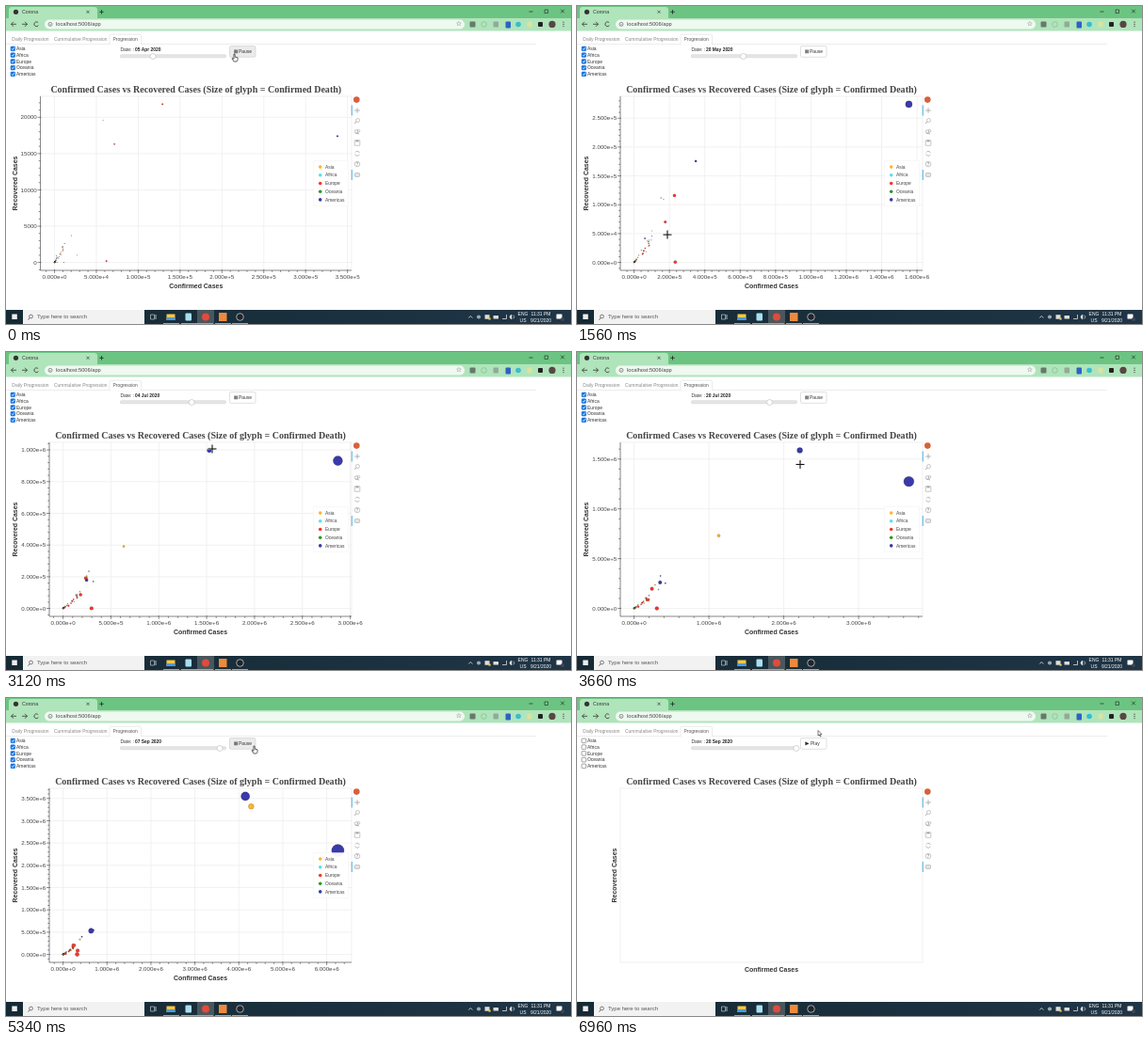
Write an HTML page with a canvas that moves like this. It is 600 px wide and 338 px high and loops after 7080 ms.

```html
<!DOCTYPE html>
<html lang="en">
<meta charset="utf-8">
<title>Progression</title>
<style>
html, body { margin: 0; width: 100%; height: 100%; overflow: hidden; background: #fff }
canvas { display: block }
</style>
<canvas id="stage" width="600" height="338"></canvas>
<script>
const c = document.getElementById('stage').getContext('2d');
const SANS = '"Liberation Sans", Arial, sans-serif';
const SERIF = '"Liberation Serif", "Times New Roman", serif';
const LOOP = 7080, STEP = 60, LAST_DAY = 168;
const TOP = 96, BOTTOM = 281, RIGHT = 367;

const ASIA = 0, AFRICA = 1, EUROPE = 2, OCEANIA = 3, AMERICAS = 4;
const continents = Object.entries({
  Asia: '#ffb52e', Africa: '#55e0f0', Europe: '#f5382c', Oceania: '#269a26', Americas: '#3a3aa8'
}).map(([name, color], i) => ({ name, color, off: 6060 + i * 135 }));

// Epidemic wave: cases added since day 0 by a logistic rise around day `mid`.
const sigmoid = v => 1 / (1 + Math.exp(-v));
const wave = (d, height, mid, width) => height * (sigmoid((d - mid) / width) - sigmoid(-mid / width));
const progress = d => (d + 4) / (LAST_DAY + 4);

// x, y: thousands of confirmed and recovered cases by day; the glyph grows as progress ** power.
const countries = [];
const country = (group, size, power, x, y) => countries.push({ group, size, power, x, y });

let seed = 11;
const rand = () => (seed = seed * 16807 % 2147483647) / 2147483647;
for (let i = 0; i < 42; i++) {
  const total = 3 + 290 * rand() ** 4, luck = .6 + .5 * rand();
  const x = d => total * progress(d) ** .85;
  const group = [ASIA, AFRICA, EUROPE, AMERICAS, EUROPE, ASIA, OCEANIA][i % 7];
  country(group, group == EUROPE ? .8 : .55, .2, x, d => x(d) * luck * (.15 + .65 * progress(d) ** .6));
}
country(ASIA, .9, .3, d => 58 + 2.1 * d, d => 19.6 + 2.05 * d);
country(ASIA, .7, .3, d => 27 + wave(d, 440, 0, 30), d => 1 + wave(d, 230, 40, 18));
country(ASIA, 3.3, 1.7, d => 3.6 + wave(d, 7812, 150, 25), d => wave(d, 6951, 157, 24));
country(AFRICA, 1.1, 1, d => 1.6 + wave(d, 650, 106, 13), d => wave(d, 600, 116, 13));
country(EUROPE, 2.1, .25, d => 129 + wave(d, 220, 0, 15), d => 21.8 + wave(d, 200, 40, 18));
country(EUROPE, 1.9, .25, d => 71.5 + wave(d, 220, 0, 12) + wave(d, 300, 155, 12), d => 16.3 + wave(d, 85, 25, 15));
country(EUROPE, 2.2, .25, d => 62 + .3 * d + wave(d, 260, 24, 16), d => .2 + .01 * d);
country(EUROPE, 1.2, .3, d => 20 + wave(d, 75, 0, 20), d => 3.7 + wave(d, 28, 0, 18));
country(AMERICAS, 1, .8, d => 2.3 + wave(d, 905, 105, 35), d => .9 + wave(d, 760, 125, 30));
country(AMERICAS, .8, .5, d => 4.5 + wave(d, 430, 82, 16), d => .6 + wave(d, 400, 85, 14));
country(AMERICAS, 2.9, 1, d => 2.1 + wave(d, 810, 112, 30), d => .6 + wave(d, 710, 120, 30));
country(AMERICAS, 5.1, 1.2, d => 11 + wave(d, 5140, 112, 28), d => wave(d, 4470, 120, 25));
country(AMERICAS, 6.9, .52, d => 338 + 27 * d + wave(d, 1750, 115, 9), d => 17.4 + wave(d, 3242, 117, 35));

function text(s, x, y, size, color = '#444', align = 'left', weight = '', face = SANS) {
  c.font = `${weight} ${size}px ${face}`;
  c.textAlign = align;
  c.textBaseline = 'middle';
  c.fillStyle = color;
  c.fillText(s, x, y);
}
function rect(x, y, w, h, color) {
  c.fillStyle = color;
  c.fillRect(x, y, w, h);
}
function box(x, y, w, h, r, fill, edge, width = .6) {
  c.beginPath();
  c.roundRect(x, y, w, h, r);
  if (fill) { c.fillStyle = fill; c.fill(); }
  if (edge) { c.strokeStyle = edge; c.lineWidth = width; c.stroke(); }
}
const dot = (x, y, r, fill, edge, width) => box(x - r, y - r, 2 * r, 2 * r, r, fill, edge, width);
function path(points, color, width = .8, fill) {
  c.beginPath();
  points.forEach((v, i) => { if (i % 2) c.lineTo(points[i - 1], v); });
  if (fill) { c.closePath(); c.fillStyle = fill; c.fill(); }
  c.strokeStyle = color;
  c.lineWidth = width;
  c.stroke();
}
const line = (x1, y1, x2, y2, color, width) => path([x1, y1, x2, y2], color, width);
function arc(x, y, r, from, to, color, width = .7) {
  c.beginPath();
  c.arc(x, y, r, from, to);
  c.strokeStyle = color;
  c.lineWidth = width;
  c.stroke();
}
function plus(x, y, r, color, width) {
  line(x - r, y, x + r, y, color, width);
  line(x, y - r, x, y + r, color, width);
}
function cross(x, y, r, color) {
  line(x - r, y - r, x + r, y + r, color, .7);
  line(x - r, y + r, x + r, y - r, color, .7);
}

function browser() {
  rect(0, 0, 600, 13, '#6cc482');
  rect(0, 13, 600, 13.5, '#b0e4bb');
  box(3, 1, 94, 14, [3, 3, 0, 0], '#b0e4bb');
  dot(10.5, 6.3, 2.6, '#333');
  text('Corona', 17, 6.5, 5.2, '#333');
  cross(87, 6.3, 1.5, '#333');
  plus(101.5, 6.3, 2.2, '#222', .8);
  line(555.5, 6, 559.5, 6, '#222', .7);
  box(572, 4, 3.5, 3.5, 0, null, '#222');
  cross(591, 5.5, 1.8, '#222');
  path([8, 16.8, 5.5, 19.3, 8, 21.8], '#333');
  line(5.5, 19.3, 11, 19.3, '#333');
  path([20, 16.8, 22.5, 19.3, 20, 21.8], '#333');
  line(17, 19.3, 22.5, 19.3, '#333');
  arc(32.3, 19.3, 2.4, .5, 5.6, '#333', .8);
  box(41, 14.5, 446, 10, 5, '#eef9f0');
  dot(47, 19.4, 2, null, '#555');
  line(47, 19, 47, 20.5, '#555', .6);
  text('localhost:5006/app', 53, 19.6, 5.7, '#444');
  text('☆', 481, 19.4, 7, '#444', 'center', '', '"DejaVu Sans", sans-serif');
  box(492.5, 16.5, 6, 6, 1, '#667a6a');
  dot(507.5, 19.5, 2.8, null, '#7fb58c');
  box(517.5, 16.5, 5.5, 6, 1, '#92aa98');
  box(530.5, 16.5, 5.5, 7, 1, '#2d62c4');
  dot(544, 19.5, 2.8, '#36bdd0');
  box(553.5, 16.5, 5, 6, 1, '#d8e3a2');
  box(565, 17, 5, 5, 1, '#222');
  dot(580, 19.4, 3.6, '#574744');
  for (const y of [17.2, 19.4, 21.6]) dot(592, y, .6, '#333');
}

function taskbar() {
  const shade = c.createLinearGradient(0, 0, 600, 0);
  shade.addColorStop(0, '#152a34');
  shade.addColorStop(1, '#203546');
  rect(0, 323, 600, 15, shade);
  rect(6.3, 327.5, 5.5, 5.5, '#eee');
  rect(18, 323, 129, 15, '#f2f2f2');
  dot(26.5, 330, 1.9, null, '#333');
  line(25.2, 331.5, 23.5, 333.5, '#333');
  text('Type here to search', 33, 330.8, 6, '#555');
  box(153.5, 328, 4, 5, 0, null, '#ddd');
  line(159, 328, 159, 333, '#ddd');
  rect(203, 323, 18, 15, '#49575d');
  rect(170.5, 327.5, 9, 6.5, '#f5c64b');
  rect(170.5, 331, 9, 3, '#4a9ad8');
  box(190.5, 326.5, 6.5, 8, 1, '#a9dff0');
  dot(212, 330.5, 4, '#e04b3c');
  rect(226, 326, 8.5, 9, '#ed8a3d');
  dot(248.5, 330.5, 3.8, '#20252a', '#ddd', .7);
  for (const x of [167, 186, 203, 222, 240]) rect(x, 337, 17, 1, '#70b5e0');
  path([491.3, 331.5, 493.3, 329.5, 495.3, 331.5], '#eee');
  dot(502, 330.5, 2.1, '#9aa8ad');
  rect(508.5, 328.2, 5, 4.5, '#ddd');
  dot(513.5, 332.5, 1.3, '#e3c33d');
  box(517.5, 329, 5.5, 3.5, .5, '#ddd');
  path([527, 332.5, 531.5, 332.5, 531.5, 328], '#ddd');
  path([535, 329.5, 537, 328, 537, 333, 535, 331.5], '#ddd', .5, '#ddd');
  arc(537, 330.5, 2.6, -.8, .8, '#ddd');
  const clock = (x, upper, lower) => {
    text(upper, x, 327.2, 5, '#fff', 'center');
    text(lower, x, 334.2, 5, '#fff', 'center');
  };
  clock(549, 'ENG', 'US');
  clock(568, '11:31 PM', '9/21/2020');
  box(584.5, 327.5, 6, 5, .5, '#fff');
  dot(591, 333, 2, '#445');
}

function controls(t, day, mouse) {
  line(0, 40.5, 563, 40.5, '#e4e4e4', .7);
  box(110, 30.2, 33.5, 10.5, [1.5, 1.5, 0, 0], '#fff', '#dedede');
  rect(110.5, 40, 32.5, 1.2, '#fff');
  text('Daily Progression', 6.3, 35.6, 5, '#888');
  text('Cummulative Progression', 51, 35.6, 4.95, '#888');
  text('Progression', 113.5, 35.6, 4.95, '#555');
  continents.forEach(({ name, off }, i) => {
    const y = 45.4 + i * 6.75, on = t < off;
    box(5, y - 2.3, 4.6, 4.6, .8, on ? '#1873e0' : '#fff', on ? '#1873e0' : '#666');
    if (on) path([6, y, 7, y + 1.1, 8.8, y - 1.2], '#fff', .8);
    text(name, 11, y + .4, 4.95, '#333');
  });
  const date = new Date(Date.UTC(2020, 3, 5 + day));
  const month = date.toLocaleString('en-US', { month: 'short', timeZone: 'UTC' });
  const label = `${String(date.getUTCDate()).padStart(2, '0')} ${month} 2020`;
  text('Date: :', 121.5, 46.7, 4.95, '#333');
  text(label, 137, 46.7, 4.9, '#222', 'left', 'bold');
  box(121.5, 51.8, 112, 3, 1, '#e6e6e6', '#c8c8c8', .5);
  dot(156 + day * .458, 53.5, 3, '#fff', '#bbb');
  const hover = mouse.y > 42 && mouse.y < 56 && mouse.x > 237 && mouse.x < 267;
  box(237.5, 42.5, 27.5, 11.8, 1.5, hover ? '#ebebeb' : '#fff', '#ccc');
  if (day < LAST_DAY) {
    rect(242.5, 46.5, 1.2, 3.8, '#333');
    rect(244.5, 46.5, 1.2, 3.8, '#333');
    text('Pause', 247, 48.6, 4.95, '#333');
  } else {
    path([242.5, 46.6, 246.3, 48.4, 242.5, 50.2], '#333', .2, '#222');
    text('Play', 248, 48.6, 4.95, '#333');
  }
  return date;
}

function toolbar() {
  const ink = '#a0a0a0', x = 373;
  dot(372.3, 99.6, 3.3, '#d9603b');
  plus(x, 111, 2.8, ink);
  dot(x + .5, 121.5, 2, null, ink);
  line(x - 1, 123, x - 3, 125, ink);
  dot(x - 1, 133.5, 1.8, null, ink);
  dot(x + 1.4, 132.8, 1.4, null, ink);
  line(x - 2, 135, x + 2, 136, ink);
  box(x - 2.8, 142.7, 5.6, 5.6, .4, null, ink);
  rect(x - 1.5, 142.7, 3, 1.7, ink);
  arc(x, 156.8, 2.5, .4, 2.9, ink);
  arc(x, 156.8, 2.5, 3.6, 6, ink);
  dot(x, 168, 2.8, null, ink);
  text('?', x, 168.3, 4.6, ink, 'center', 'bold');
  box(x - 2.6, 177.6, 5.2, 3.8, .8, '#e6e6e6', ink);
  for (const y of [105.5, 174]) rect(366.7, y, 1.1, 11, '#5bb4e2');
}

// Step of 1, 2, 5 or 10 times a power of ten that comes nearest to six intervals.
function tickStep(range) {
  const unit = 10 ** Math.floor(Math.log10(range / 6));
  const miss = m => Math.abs(6 - range / (m * unit));
  return unit * [1, 2, 5, 10].reduce((a, b) => miss(b) < miss(a) ? b : a);
}

// Five minor ticks per step; large scales are labelled in scientific form.
function makeTicks(max) {
  const step = tickStep(max * 1.1), ticks = [];
  const first = Math.ceil(-max * .05 / step * 5), last = Math.floor(max * 1.05 / step * 5);
  const sci = Math.floor(last / 5) * step >= 1e5;
  for (let i = first; i <= last; i++) {
    const v = i * step / 5;
    ticks.push({ v, major: i % 5 == 0, label: sci ? v.toExponential(3) : String(Math.round(v)) });
  }
  return { sci, ticks };
}

function chart(t, day) {
  const live = continents.filter(g => t < g.off);
  const points = countries.filter(p => t < continents[p.group].off).map(p => ({
    color: continents[p.group].color,
    x: p.x(day) * 1000, y: p.y(day) * 1000, r: p.size * progress(day) ** p.power
  }));
  const maxX = Math.max(0, ...points.map(p => p.x)), maxY = Math.max(0, ...points.map(p => p.y));
  const yAxis = live.length && makeTicks(maxY);
  const left = live.length && !yAxis.sci ? 36.5 : 46, mid = (left + RIGHT) / 2;
  text('Confirmed Cases vs Recovered Cases (Size of glyph = Confirmed Death)', mid, 89.2, 10.02, '#444', 'center', 'bold', SERIF);
  text('Confirmed Cases', mid, live.length ? 298 : 289, 6.95, '#333', 'center', 'bold');
  c.save();
  c.translate(live.length ? 10.4 : 40.4, 188.5);
  c.rotate(-Math.PI / 2);
  text('Recovered Cases', 0, 0, 6.95, '#333', 'center', 'bold');
  c.restore();
  box(left, TOP, RIGHT - left, BOTTOM - TOP, 0, null, '#e6e6e6', .6);
  if (!live.length) return;

  const w = RIGHT - left, h = BOTTOM - TOP;
  const px = v => left + w * (.05 + v / maxX) / 1.1;
  const py = v => BOTTOM - h * (.05 + v / maxY) / 1.1;
  for (const { v, major, label } of makeTicks(maxX).ticks) {
    const x = px(v);
    if (major) {
      line(x, TOP, x, BOTTOM, '#ebebeb', .7);
      text(label, x, 288.4, 6.2, '#444', 'center');
    }
    line(x, BOTTOM - (major ? 1 : 0), x, BOTTOM + (major ? 3 : 1.8), '#444', .6);
  }
  for (const { v, major, label } of yAxis.ticks) {
    const y = py(v);
    if (major) {
      line(left, y, RIGHT, y, '#ebebeb', .7);
      text(label, left - 3.7, y + .4, 6.2, '#444', 'right');
    }
    line(left - (major ? 3 : 1.8), y, left + (major ? 1 : 0), y, '#444', .6);
  }
  line(left, TOP, left, BOTTOM, '#444', .6);
  line(left, BOTTOM, RIGHT, BOTTOM, '#444', .6);
  for (const p of points) dot(px(p.x), py(p.y), Math.max(.4, p.r), p.color, 'rgba(0,0,0,.5)', .3);

  const row = 8.7, rows = live.length * row, y0 = 188.5 - rows / 2;
  box(326.5, y0 - 2.2, 37, rows + 4.4, 0, 'rgba(255,255,255,.95)', '#f0f0f0', .5);
  live.forEach(({ name, color }, i) => {
    const y = y0 + (i + .5) * row;
    dot(333.7, y, 1.8, color);
    text(name, 339, y + .3, 4.9, '#444');
  });
}

function tooltip(date, day) {
  const grow = 1 + (day - 66) * .012;
  const count = n => Math.round(n * grow).toLocaleString('en-US');
  box(68, 249, 66, 40, 1.5, 'rgba(255,255,255,.96)', '#ddd');
  path([68, 266, 65, 268, 68, 270], '#ddd', .3, '#fff');
  const rows = {
    'As at': date.toISOString().slice(0, 10), 'Country': 'Ecuador', 'Confirmed Cases': count(44440),
    'RecoveredDeath': count(21862), 'Death Cases': count(3720)
  };
  Object.entries(rows).forEach(([key, value], i) => {
    const y = 254.5 + i * 7.2;
    text(key + ':', 106.5, y, 4.75, '#35a5d6', 'right');
    text(value, 108, y, 4.75, '#333');
  });
}

const stop = (arrive, leave, x, y) => ({ arrive, leave, x, y });
const stops = [
  stop(0, 180, 243, 54), stop(780, 960, 206, 160), stop(1740, 2460, 63, 268),
  stop(3060, 3180, 219, 103), stop(4140, 4320, 255, 136), stop(5160, 5700, 264, 54),
  stop(6000, 6060, 8, 45), stop(6600, 6660, 8, 72), stop(6900, LOOP, 257, 38)
];
function mouseAt(t) {
  const a = stops.findLast(s => s.arrive <= t), b = stops[stops.indexOf(a) + 1] || a;
  const u = t > a.leave ? (t - a.leave) / (b.arrive - a.leave) : 0;
  return { x: a.x + (b.x - a.x) * u, y: a.y + (b.y - a.y) * u };
}

function pointer({ x, y }) {
  const shape = (points, width) => path(points.map((v, i) => v + (i % 2 ? y : x)), '#222', width, '#fff');
  if (y > TOP && x > 46 && x < RIGHT) {
    plus(x, y, 4.8, '#fff', 1.8);
    plus(x, y, 4.5, '#111', 1.1);
  } else if (y > 41 && y < 76) {
    shape([-1, -3, 0, -3, .4, .3, 3, .8, 3, 3.4, 2, 5, -1, 5, -3, 2, -2.6, 1.2, -1, 2.4], .7);
  } else {
    shape([-1, -3.5, -1, 2, .3, 1, 1.3, 3, 2.1, 2.6, 1.2, .6, 3, .5], .6);
  }
}

function draw(now) {
  const step = Math.min(116, Math.floor(now % LOOP / STEP)), t = step * STEP;
  const day = Math.min(LAST_DAY, Math.floor(step * 1.742 + .35));
  const mouse = mouseAt(t);
  rect(0, 0, 600, 338, '#fff');
  browser();
  const date = controls(t, day, mouse);
  chart(t, day);
  toolbar();
  if (t >= 1980 && t < 2460) tooltip(date, day);
  pointer(mouse);
  taskbar();
}

const start = performance.now();
function tick() {
  draw(performance.now() - start);
  requestAnimationFrame(tick);
}
tick();
</script>
</html>
```
